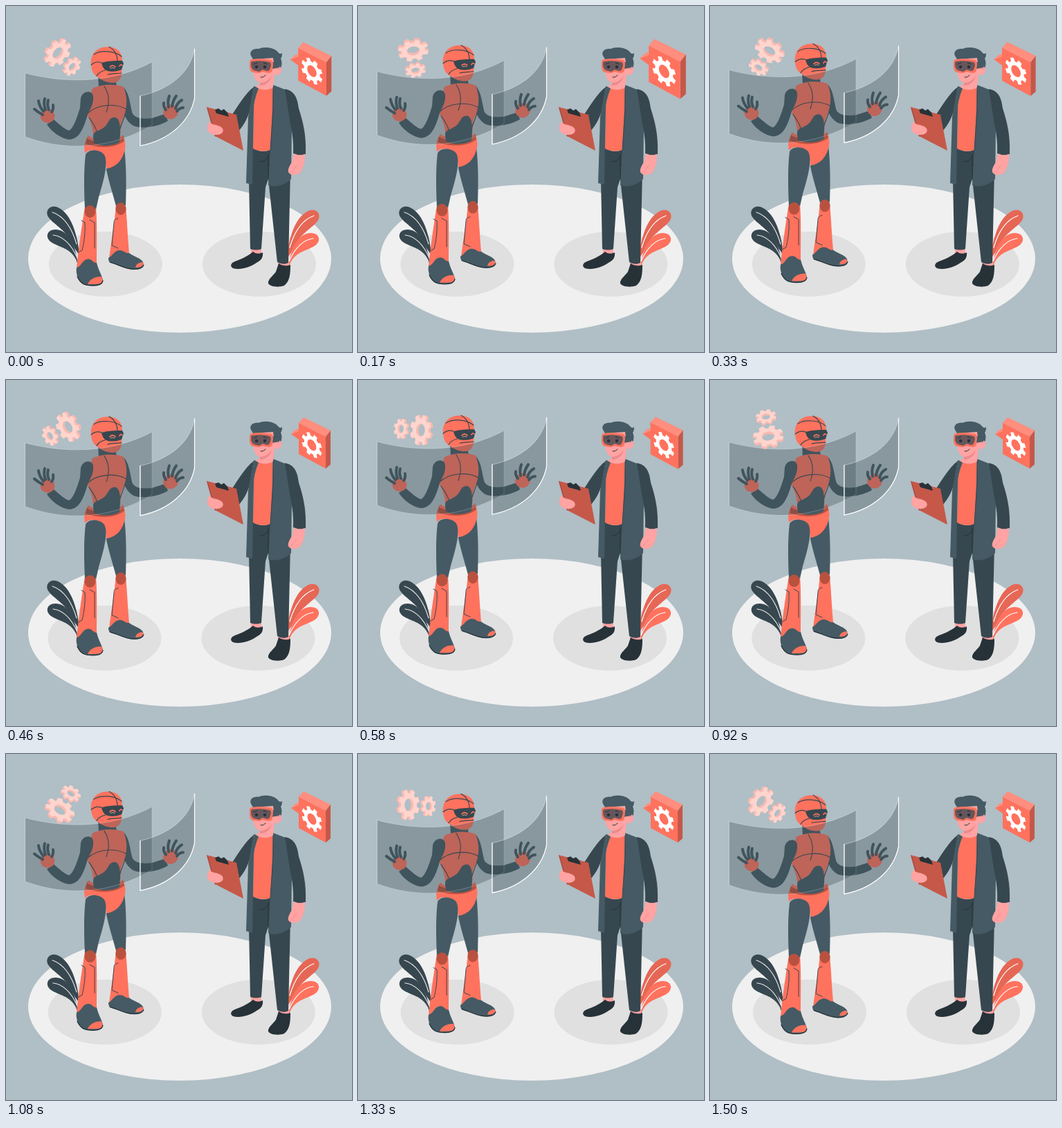
An HTML page with a canvas for the animation above (1.54 s loop, 500 by 500 pixels).

```html
<!DOCTYPE html>
<html lang="en">
<head>
<meta charset="utf-8">
<title>Robot and engineer</title>
<style>
  html, body { margin: 0; width: 100%; height: 100%; overflow: hidden; background: #b0bec5; }
  canvas { display: block; width: 100vw; height: 100vh; }
</style>
</head>
<body>
<canvas id="stage" width="500" height="500"></canvas>
<script>
const ctx = document.getElementById('stage').getContext('2d');
const LOOP = 1540, STEPS = 37, START = 0.022;
const CORAL = '#ff725e', DULL = '#b9513f', DARK = '#37474f', MID = '#455a64',
      INK = '#263238', SKIN = '#ffa3a3', GLASS = 'rgba(55,71,79,.32)';

function fill(color, d) {
  ctx.fillStyle = color;
  ctx.fill(new Path2D(d));
}

function line(color, width, d) {
  ctx.strokeStyle = color;
  ctx.lineWidth = width;
  ctx.lineCap = ctx.lineJoin = 'round';
  ctx.stroke(new Path2D(d));
}

function oval(color, x, y, rx, ry = rx, turn = 0) {
  ctx.fillStyle = color;
  ctx.beginPath();
  ctx.ellipse(x, y, rx, ry, turn, 0, 7);
  ctx.fill();
}

function group(draw) {
  ctx.save();
  draw();
  ctx.restore();
}

function gearPath(r, hole) {
  const path = new Path2D(), pitch = Math.PI / 4;
  for (let i = 0; i < 8; i++) {
    for (const [radius, offset] of [[.75, .18], [1, .29], [1, .71], [.75, .82]]) {
      const a = (i + offset) * pitch;
      path.lineTo(radius * r * Math.cos(a), radius * r * Math.sin(a));
    }
  }
  path.closePath();
  path.moveTo(hole * r, 0);
  path.arc(0, 0, hole * r, 0, 2 * Math.PI);
  return path;
}

function plant(upper, lower, vein) {
  fill(upper, 'M106 360C104 333 95 300 75 291C63 286 55 297 62 306C70 317 89 324 99 350Z');
  fill(lower, 'M104 374C101 347 91 324 72 323C59 323 56 334 65 341C77 349 92 349 101 366Z');
  line(vein, 1.2, 'M67 298C84 304 95 320 102 344');
  line(vein, 1.2, 'M68 331C84 333 95 346 103 364');
}

function ground(shift) {
  ctx.fillStyle = '#b0bec5';
  ctx.fillRect(0, 0, 500, 500);
  oval('#f0f0f0', 251, 365, 219, 107);
  oval('#e0e0e0', 144 + shift, 373, 82, 47);
  oval('#e0e0e0', 366 + shift, 373, 82, 47);
  plant(DARK, DARK, '#e6e6e6');
  group(() => {
    ctx.translate(512, 5);
    ctx.scale(-1, 1);
    plant('#e66755', CORAL, '#fff');
  });
}

function robotLegs() {
  fill(MID, 'M145 233C156 231 167 220 171 206C174 230 174 262 173 288L159 289C154 270 148 252 145 236Z');
  fill(CORAL, 'M159 286C161 303 170 303 173 288C175 312 176 336 178 358L149 365C152 340 157 315 159 286Z');
  line(DARK, 1, 'M162 307C158 308 156 309 156 313L153 346L162 350');
  oval(DULL, 166, 293, 7.5, 9);
  fill(MID, 'M148 364C154 361 156 354 163 353C170 352 172 358 178 357C184 362 195 364 198 370C200 376 196 381 186 381C175 381 166 375 154 372C149 371 148 368 148 364Z');
  fill(CORAL, 'M187 378C188 373 191 371 197 370C200 374 197 378 187 378Z');
  line(INK, 1.2, 'M150 370C163 374 174 381 187 380C194 380 198 378 199 374');

  fill(CORAL, 'M119 187C134 198 156 198 169 186C172 194 173 201 172 206C169 223 159 233 145 235C145 222 140 212 130 209C121 207 117 210 114 213L113 204C114 196 116 191 119 187Z');
  fill(DULL, 'M117 191C134 201 157 200 170 189L171 195C157 206 133 206 115 199Z');
  fill(MID, 'M115 215C119 206 136 207 142 215C148 226 142 250 134 276L130 294L114 294C113 270 112 238 115 215Z');
  fill(CORAL, 'M114 290C116 307 127 307 130 291C132 315 131 345 131 372L102 379C105 348 110 315 114 290Z');
  line(DARK, 1, 'M109 310L114 313C115 330 112 345 110 353L105 356M121 309L128 313V350');
  oval(DULL, 121.5, 297, 8, 9);
  fill(MID, 'M102 378C109 377 110 367 117 366C124 364 126 372 131 371C134 383 139 390 140 396C141 403 132 404 122 404C112 404 107 400 104 393C102 388 101 383 102 378Z');
  fill(CORAL, 'M118 402C121 394 130 391 138 391C142 399 138 402 128 402Z');
  line(INK, 1.3, 'M103 391C108 402 114 404 126 404C134 404 139 402 140 397');
}

function robotBody() {
  fill(MID, 'M133 100L134 118C142 124 155 122 160 116L158 106Z');
  fill(MID, 'M169 117C178 124 179 141 182 153C184 162 197 164 211 162L230 156L234 166C219 175 195 178 184 173C172 166 168 151 167 140Z');
  fill(CORAL, 'M125 119C138 113 158 112 170 117C177 134 175 152 167 167L165 187L126 188C126 176 122 167 118 158C117 145 121 129 125 119Z');
  fill(MID, 'M126 190C126 180 132 182 139 177C148 173 147 162 156 161C164 160 167 173 164 197C153 203 138 203 127 198Z');
  line(DARK, 1.1, 'M142 116C150 128 149 142 145 153M118 155C132 142 158 140 174 149M120 161C127 171 130 176 131 181M172 157C170 164 167 170 165 177');
  fill(MID, 'M108 133C111 122 124 121 126 130C127 143 121 149 118 157C113 174 107 192 92 193C80 192 66 182 59 171L69 164C78 172 86 179 91 180C98 177 104 157 107 147Z');
  oval(CORAL, 60, 159, 10.5, 10);
  line(MID, 4, 'M53 157Q47 154 41 149M54 152Q48 145 47 137M57 150Q54 142 56 134M62 150Q59 143 61 136M66 153Q69 149 68 143');
  oval(CORAL, 238, 153, 11, 10.5, -.4);
  line(MID, 4, 'M231 150Q227 145 228 140M235 146Q233 138 236 130M240 145Q241 137 246 130M245 148Q247 140 254 136M247 152Q251 147 256 147');
}

function robotHead() {
  fill(CORAL, 'M123 86C121 70 131 59 147 59C161 59 168 67 168 79L167 98C166 107 161 111 154 111C145 111 138 107 133 103C126 99 124 94 123 86Z');
  fill(DARK, 'M138 82C148 79 158 79 168 79L170 83L167 92C160 95 148 96 143 92Q139 88 138 82Z');
  line(DARK, 1.2, 'M149 59C157 63 161 71 161 79M127 70C138 63 157 65 167 73M123 85C128 81 133 80 138 82M131 101C134 96 138 94 143 93M147 99C154 97 160 98 167 97');
  line(CORAL, 1.6, 'M150 88Q154 84 158 88M164 87Q166 83 168 86');
  line('#ffb4aa', .8, 'M151 90Q154 88 157 90');
}

function screens() {
  const wide = 'M28 97C80 111 150 114 211 81L211 172C150 208 85 210 28 189Z';
  const side = 'M194 130C235 121 266 98 272.5 62L272.5 133C266 168 235 194 194 202Z';
  fill(GLASS, wide);
  line('rgba(255,255,255,.3)', .8, wide);
  fill(GLASS, side);
  line('rgba(255,255,255,.5)', .8, side);
  line('#fff', 1.2, 'M194 130V202C235 194 266 168 272.5 133V62');
}

function pinkGear(x, y, r, depth) {
  group(() => {
    ctx.translate(x, y);
    ctx.rotate(-.85);
    ctx.scale(1, .68);
    const shape = gearPath(r, .42);
    ctx.translate(0, -depth / 2);
    ctx.fillStyle = '#f8bab1';
    for (let i = 0; i < depth; i++) {
      ctx.fill(shape, 'evenodd');
      ctx.translate(0, 1);
    }
    ctx.fillStyle = '#ffd5ce';
    ctx.fill(shape, 'evenodd');
  });
}

function gears(turn) {
  group(() => {
    ctx.translate(82, 73);
    ctx.rotate(turn);
    pinkGear(-8, -6, 22.5, 5);
    pinkGear(13, 14, 15, 4);
  });
}

function bubble(scale) {
  group(() => {
    ctx.translate(440, 91);
    ctx.scale(scale, scale);
    ctx.translate(-440, -91);
    fill('#ff8e7e', 'M423 62L430 54L469 73L462 82Z');
    fill('#c4584a', 'M462 82L469 73V122L462 128Z');
    fill(CORAL, 'M423 62L462 82V128L423 107V86L412 78L423 73Z');
    fill('#ff8e7e', 'M412 78L418 72L423 70V74Z');
    ctx.transform(.87, .46, 0, 1, 442, 94);
    ctx.fillStyle = '#fff';
    ctx.fill(gearPath(17, .44), 'evenodd');
  });
}

function engineer() {
  fill(SKIN, 'M354 348H369V359H354ZM393 367L409 369L408 379L393 377Z');
  fill(INK, 'M357 355C362 359 367 358 371 356C372 364 368 368 362 371C352 378 338 382 328 379C323 376 325 371 331 369C342 365 350 361 357 355Z');
  fill(INK, 'M394 372C400 376 406 376 411 374C411 388 410 398 402 404C394 407 382 406 379 401C378 395 386 390 390 384Z');
  fill(DARK, 'M356 205C366 212 378 211 384 206L411 238L408 371C403 374 397 373 392 370L379 250L375 262L369 351C364 353 359 353 353 351L351 250Z');
  line(INK, 1, 'M379 218Q374 226 367 225M379 214L379 250');

  fill(DARK, 'M358 117C345 127 335 145 326 158L325 166L336 181C344 172 349 162 352 152Z');
  fill(CORAL, 'M362 121C370 118 380 118 387 120L382 208C374 211 364 210 357 206L358 146Z');
  fill(MID, 'M358 116L366 117C361 128 358 140 358 150L356 258L347 256L350 160Z');
  fill(MID, 'M386 114L404 121C413 126 415 145 413 175L412 250C404 258 390 263 379 259L382 208L385 150Z');
  line(DARK, 1, 'M386 117L386 150L382 208');
  fill(DARK, 'M403 120C415 122 421 130 423 148C430 170 434 187 433 214C427 216 420 216 415 213C416 195 413 180 410 165Z');
  fill(SKIN, 'M416 213C421 216 427 216 432 214C432 226 430 235 424 242C418 245 410 245 408 240C407 236 410 230 413 226Z');
  line('#e98689', .8, 'M420 230Q416 237 411 241');

  fill('#c55848', 'M290 146L333 157L343 209L302 188Z');
  fill('#a84a3d', 'M290 146L292 148L303 188L302 189Z');
  fill(INK, 'M302 150L307 148L311 151L315 149L320 154L322 160L304 155Z');
  fill(SKIN, 'M293 167C297 172 305 171 311 175C316 179 314 185 306 186C297 187 290 183 291 174Z');

  fill(MID, 'M354 72C351 65 358 61 365 62C374 58 389 60 394 68Q397 70 399 68Q399 74 397 76C401 84 396 92 394 99L385 92L384 78L357 77Z');
  fill(SKIN, 'M358 77L386 75L388 90C392 84 399 87 398 94C397 99 392 101 388 99L386 117C380 123 367 122 360 116C365 115 367 113 367 111C361 110 357 101 357 92Z');
  fill('#ee898c', 'M367 111C375 111 381 106 384 101C382 109 376 115 367 115Z');
  fill(MID, 'M384 81L396 83L395 89L384 91Z');
  fill(CORAL, 'M355 77Q369 75 383 78Q386 79 386 84L385 93Q384 97 379 97L371 95L366 97L357 96Q353 95 352 89L352 81Q352 78 355 77Z');
  fill('#66565b', 'M356 80Q369 78 381 81Q383 82 383 86L381 92Q380 94 377 94L371 92L366 95L358 93Q355 91 354 87V82Q354 80 356 80Z');
  oval(INK, 362, 88, 2.2);
  oval(INK, 374, 88, 2.2);
  line(INK, 1, 'M358 84L363 82M372 82L377 84');
  line(INK, 1, 'M368 103Q372 104 375 100');
  line('#e98689', .8, 'M392 91Q395 89 396 92');
}

function pulse(p) {
  const peak = (at, rise, fall) =>
    Math.max(0, p < at ? 1 - (at - p) / rise : 1 - (p - at) / fall);
  return 1 + .2 * (peak(.1, .1, .2) + peak(.5, .1, .1));
}

// 24 steps a second; the last few cover slightly less ground.
function phaseAt(ms) {
  const step = Math.floor((ms % LOOP + 4) / (LOOP / STEPS)) % STEPS;
  const degrees = step <= 32 ? step * 10 : 320 + (step - 32) * 8;
  return START + degrees / 360;
}

function draw(ms) {
  const p = phaseAt(ms) % 1;
  const lift = 1 - Math.abs(1 - 2 * p);
  ground(-2.4 * lift);
  group(() => {
    ctx.translate(0, 10 * (2 * START - lift));
    robotLegs();
    robotBody();
    robotHead();
    screens();
  });
  gears((p - START) * 2 * Math.PI);
  bubble(pulse(p));
  engineer();
}

const began = performance.now();
function tick() {
  draw(performance.now() - began);
  requestAnimationFrame(tick);
}
tick();
</script>
</body>
</html>
```
